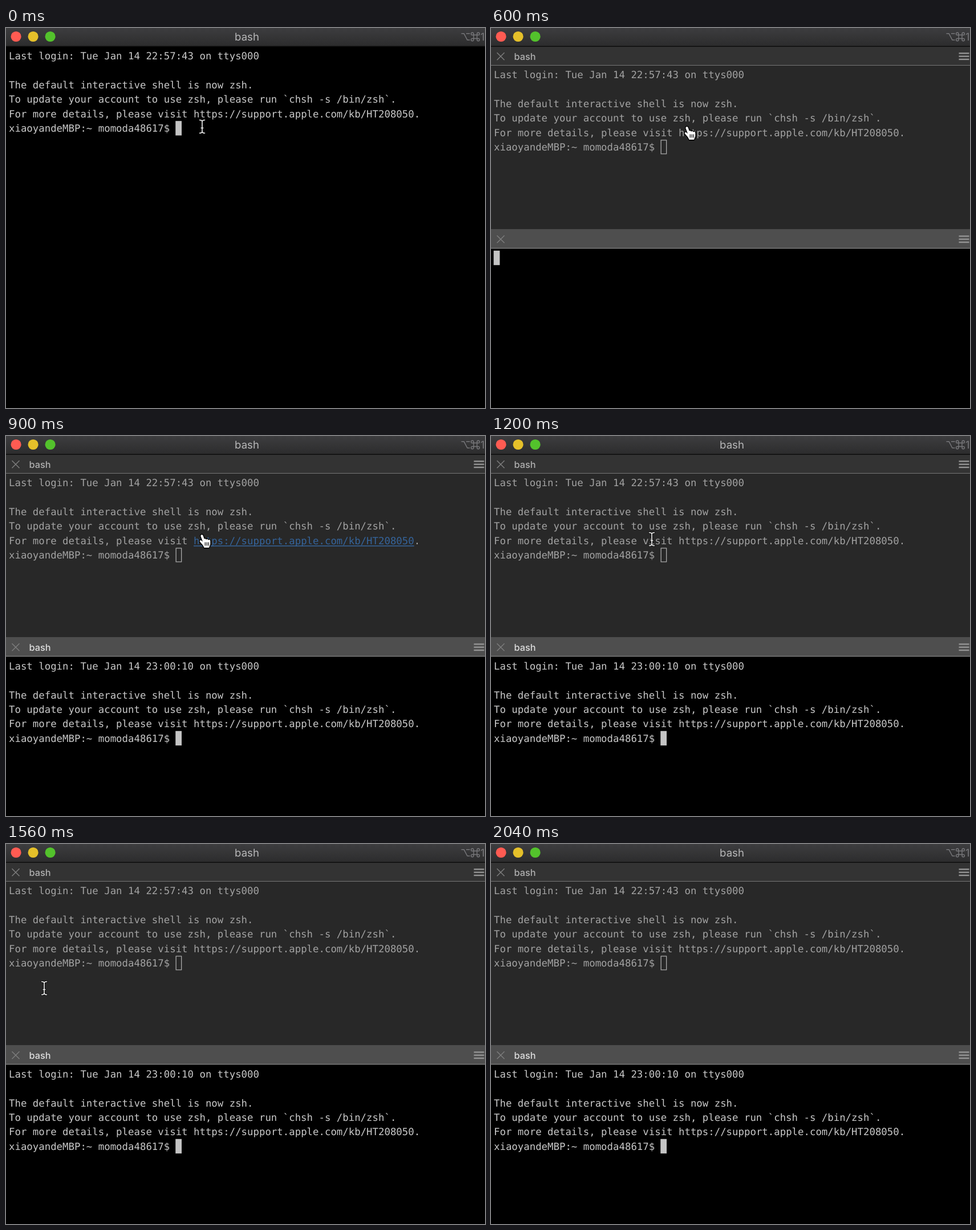
Recreate the animation shown at these times as an HTML page with a canvas. Size 840 px wide and 667 px high, loop 2.22 s.

```html
<!DOCTYPE html>
<html lang="en">
<head>
<meta charset="utf-8">
<title>Split terminal</title>
<style>
html, body { margin: 0; width: 100%; height: 100%; overflow: hidden; background: #000; }
canvas { display: block; }
</style>
</head>
<body>
<canvas id="stage" width="840" height="667"></canvas>
<script>
const W = 840, H = 667, LOOP = 2220, STEP = 60;
const ctx = document.getElementById('stage').getContext('2d');
ctx.textRendering = 'geometricPrecision';

const MONO = '17.36px "DejaVu Sans Mono", "Noto Sans Mono", monospace';
const ui = (size, weight = 400) => `${weight} ${size}px Inter, Roboto, sans-serif`;
const CHAR = 10.452, LINE = 25.4, LEFT = 5;
const INTRO = 'For more details, please visit ';
const URL_TEXT = 'https://support.apple.com/kb/HT208050';
const PROMPT = 'xiaoyandeMBP:~ momoda48617$ ';

const SPLIT = 600, LINK_ON = 660, LOGIN = 720, SHELL = 780, MOVE = 1200;

// pointer path: time, x, y
const PATH = [
  [1200, 282, 181], [1320, 205, 192], [1440, 118, 220], [1560, 67, 253],
  [1620, 68, 420], [1680, 68, 614], [1740, 46, 646], [1800, 22, 662], [1860, 20, 700]
];

function rect(x, y, w, h, color) {
  ctx.fillStyle = color;
  ctx.fillRect(x, y, w, h);
}

function text(str, x, y, font, color, align = 'left') {
  ctx.font = font;
  ctx.textAlign = align;
  ctx.fillStyle = color;
  ctx.fillText(str, x, y);
}

function stroke(path, color, width) {
  ctx.strokeStyle = color;
  ctx.lineWidth = width;
  ctx.stroke(path instanceof Path2D ? path : new Path2D(path));
}

function shortcut() {
  const color = '#77777a';
  stroke('M798.5 9.7H803L809 21H813.5M807 9.7H813.5', color, 1.5);
  const p = new Path2D('M820 12.3H826V18.5H820Z');
  for (const sx of [-1, 1]) for (const sy of [-1, 1]) {
    const x = 823 + sx * 5.2, y = 15.4 + sy * 5.2;
    p.moveTo(x + 2.2, y);
    p.arc(x, y, 2.2, 0, Math.PI * 2);
  }
  stroke(p, color, 1.4);
  text('1', 832, 22, ui(18.5), color);
}

function titleBar(showTitle) {
  const g = ctx.createLinearGradient(0, 0, 0, 32);
  g.addColorStop(0, '#3d3d3f');
  g.addColorStop(1, '#2c2c2d');
  rect(0, 0, W, 32, g);
  rect(0, 31.5, W, 1.2, '#111');
  ['#ff5b52', '#e5c02a', '#53c22c'].forEach((color, i) => {
    ctx.fillStyle = color;
    ctx.beginPath();
    ctx.arc(17.6 + 30 * i, 15, 9.1, 0, Math.PI * 2);
    ctx.fill();
  });
  if (showTitle) text('bash', 422.5, 22.3, ui(18.6), '#b8b8b9', 'center');
  shortcut();
}

function tabBar(y, h, bg, line, label, color) {
  rect(0, y, W, h, bg);
  rect(0, y + h - 1, W, 1.3, line);
  const c = y + h - 16.3;
  stroke(`M10.5 ${c - 6.5}L23.5 ${c + 6.5}M23.5 ${c - 6.5}L10.5 ${c + 6.5}`, '#7d7d7d', 1.5);
  for (const d of [-5.3, 0, 5.3]) rect(820.5, c + d - 1.2, 18, 2.4, '#949494');
  if (label) text(label, 40.5, c + 5.8, ui(16.3, 500), color);
}

function session(base, time, color, rows = 6, linked = false) {
  const put = (str, row, col = 0, tint = color) =>
    text(str, LEFT + col * CHAR, base + row * LINE, MONO, tint);
  if (rows > 0) put(`Last login: Tue Jan 14 ${time} on ttys000`, 0);
  if (rows < 6) return;
  put('The default interactive shell is now zsh.', 2);
  put('To update your account to use zsh, please run `chsh -s /bin/zsh`.', 3);
  put(INTRO, 4);
  const start = INTRO.length, end = start + URL_TEXT.length;
  put(URL_TEXT, 4, start, linked ? '#35649b' : color);
  if (linked) rect(LEFT + start * CHAR, base + 4 * LINE + 2.4, URL_TEXT.length * CHAR, 1.5, '#35649b');
  put('.', 4, end);
  put(PROMPT, 5);
}

function caret(base, row, col, color, hollow) {
  const x = LEFT + col * CHAR, y = base + row * LINE - 19;
  if (hollow) stroke(`M${x + 0.5} ${y + 0.7}h9.5v24h-9.5z`, color, 1.3);
  else rect(x - 0.4, y, 10.8, 25.4, color);
}

function beam(x, y) {
  ctx.save();
  ctx.translate(x, y);
  ctx.lineCap = 'round';
  const p = new Path2D('M-4.5 -11.5Q-0.5 -11.5 0 -9Q0.5 -11.5 4.5 -11.5M0 -9V9M-4.5 11.5Q-0.5 11.5 0 9Q0.5 11.5 4.5 11.5M-1.8 2.5H1.8');
  stroke(p, 'rgba(0,0,0,.75)', 3.6);
  stroke(p, '#f4f4f4', 1.6);
  ctx.restore();
}

function hand() {
  const p = new Path2D('M342.6 173.4C340.8 174.2 341.7 176.6 342.3 178L345 185.4L342.4 183.3' +
    'C340.3 182 338.8 184 340.2 185.7L345.2 191.4L347.6 196H356L358.3 190V184' +
    'C357.8 181.6 355.5 181.5 354.8 183C354.1 180.6 351.8 180.5 351.1 182' +
    'C350.2 179.8 348.2 179.8 347.7 180.8L345.6 174.8C344.9 173.2 343.8 172.8 342.6 173.4Z');
  ctx.lineJoin = 'round';
  stroke(p, '#000', 2.8);
  ctx.fillStyle = '#fff';
  ctx.fill(p);
  stroke('M349.3 186.5V192.5M352.3 186.5V192.5M355.2 186.5V192.5', '#000', 1.2);
}

function pointerAt(t) {
  const i = PATH.findIndex(p => p[0] > t);
  if (i < 0) return null;
  const [t0, x0, y0] = PATH[i - 1], [t1, x1, y1] = PATH[i];
  const k = (t - t0) / (t1 - t0);
  return [x0 + (x1 - x0) * k, y0 + (y1 - y0) * k];
}

function draw(t) {
  rect(0, 0, W, H, '#000');
  if (t < SPLIT) {
    titleBar(true);
    session(55.2, '22:57:43', '#c9c9c9');
    caret(55.2, 5, PROMPT.length, '#c4c4c4');
    beam(344, 173);
    return;
  }
  const ready = t >= LOGIN, full = t >= SHELL;
  titleBar(ready);
  tabBar(33, 33, '#333', '#777', 'bash', '#b0b0b0');
  rect(0, 66, W, 287, '#282828');
  session(88.2, '22:57:43', '#a2a2a2', 6, t >= LINK_ON && t < MOVE);
  caret(88.2, 5, PROMPT.length, '#aaa', true);

  tabBar(353, 34, '#4e4e4e', '#858585', ready ? 'bash' : '', '#dedede');
  session(409.8, '23:00:10', '#c9c9c9', full ? 6 : ready ? 1 : 0);
  if (full) caret(409.8, 5, PROMPT.length, '#c4c4c4');
  else caret(409.8, ready ? 1 : 0, 0, '#c4c4c4');

  if (t < MOVE) hand();
  else {
    const p = pointerAt(t);
    if (p) beam(...p);
  }
}

const began = performance.now();
function tick() {
  const t = (performance.now() - began) % LOOP;
  draw(Math.floor(t / STEP) * STEP);
  requestAnimationFrame(tick);
}
tick();
</script>
</body>
</html>
```
